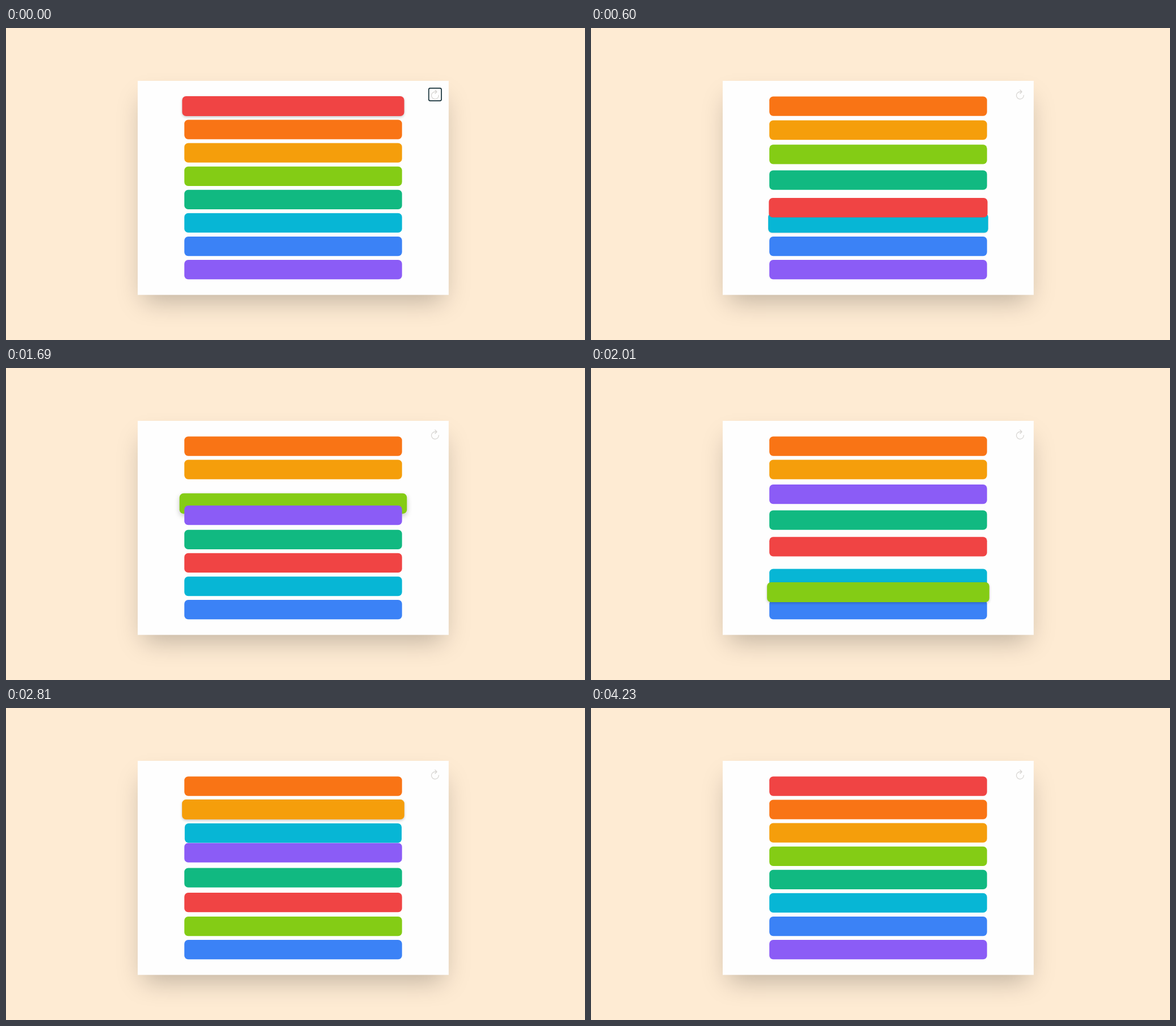
Recreate the animation shown at these times as an HTML page. Size 1020x549 px, loop 4810 ms.

```html
<!DOCTYPE html>
<html lang="en">
<head>
<meta charset="utf-8">
<title>Reorder list</title>
<style>
  html, body { margin: 0; width: 100%; height: 100%; overflow: hidden; background: #feebd3; }
  #card {
    position: absolute; left: 232px; top: 93.4px; width: 640px; height: 440px;
    transform: scale(.856); transform-origin: 0 0;
    background: #fefefe; box-shadow: 0 25px 50px -12px rgba(0, 0, 0, .25);
  }
  .bar { position: absolute; left: 96px; top: 32px; width: 448px; height: 40px; border-radius: 8px; }
  #button { position: absolute; left: 599.5px; top: 16px; width: 24px; height: 24px; border-radius: 2px; }
  #button svg { display: block; width: 24px; height: 24px; fill: none; stroke-width: 32; stroke-linecap: round; stroke-linejoin: round; }
</style>
</head>
<body>
<div id="card">
  <div id="button">
    <svg viewBox="0 0 512 512">
      <path d="M330 138H256A160 160 0 1 0 416 294M256 58L336 138L256 218"/>
    </svg>
  </div>
</div>
<script>
const LOOP = 4810, RESET = 3667, SHIFT = 450, PITCH = 48;
const EDGE = 20 / PITCH; // half a bar, in slots
const COLORS = ['#f04444', '#f97415', '#f59e0b', '#84cc15', '#11b981', '#07b6d5', '#3b82f6', '#8b5cf6'];
const [RED, ORANGE, AMBER, LIME, GREEN, CYAN, BLUE, VIOLET] = COLORS.keys();

const card = document.getElementById('card');
const button = document.getElementById('button');
const icon = button.querySelector('svg');

const clamp = x => Math.min(1, Math.max(0, x));
const mix = (a, b, k) => a + (b - a) * k;
const smooth = x => { x = clamp(x); return x * x * (3 - 2 * x); };

// cubic-bezier(.4, 0, .1, 1)
function ease(x) {
  x = clamp(x);
  let lo = 0, hi = 1;
  for (let i = 0; i < 20; i++) {
    const s = (lo + hi) / 2, r = 1 - s;
    if (1.2 * r * r * s + .3 * r * s * s + s * s * s < x) lo = s; else hi = s;
  }
  return smooth(lo);
}

// Overdamped return to the slot: stiffness 200, damping 40
function settle(ms) {
  const a = 5.86, b = 34.14, t = ms / 1000;
  return (b * Math.exp(-a * t) - a * Math.exp(-b * t)) / (b - a);
}

// Underdamped step for scaling: stiffness 550, damping 30
function spring(ms) {
  if (ms <= 0) return 0;
  const t = ms / 1000, w = 18.03;
  return 1 - Math.exp(-15 * t) * (Math.cos(w * t) + 15 / w * Math.sin(w * t));
}

function along(points, t) {
  const i = Math.max(1, points.findIndex(p => p[0] >= t));
  const [t0, y0] = points[i - 1], [t1, y1] = points[i];
  return mix(y0, y1, clamp((t - t0) / (t1 - t0)));
}

const bars = COLORS.map(color => {
  const el = document.createElement('div');
  el.className = 'bar';
  el.style.background = color;
  card.append(el);
  return { el, offsets: [], sizes: [], lifts: [] };
});

function grow(id, on, off, amount) {
  bars[id].sizes.push(t => amount * (spring(t - on) - spring(t - off)));
}
const hover = (id, on, off) => grow(id, on, off, .02);

const order = [...COLORS.keys()];

// Drags a bar past one neighbour at each crossing; each neighbour slides into the gap.
function drag(id, dir, press, crossings, release, end) {
  const from = order.indexOf(id), final = from + dir * crossings.length;
  const points = [[press, from]];
  crossings.forEach((time, i) => {
    const slot = from + dir * i, neighbour = order[slot + dir];
    points.push([time, slot + dir * (1 - EDGE)]);
    bars[neighbour].offsets.push(t => -dir * ease((t - time) / SHIFT));
    order[slot] = neighbour;
    order[slot + dir] = id;
  });
  points.push([release, end]);
  bars[id].offsets.push(t =>
    t < press ? 0 :
    t < release ? along(points, t) - from :
    final - from + (end - final) * settle(t - release));
  bars[id].lifts.push([press, release + 700]);
  grow(id, press, release, .03);
}

hover(RED, -1000, 495);
drag(RED, 1, 70, [180, 247, 306, 373], 495, 4.54);
hover(CYAN, 540, 650);
hover(BLUE, 650, 740);
hover(VIOLET, 740, 1208);
drag(VIOLET, -1, 870, [980, 1056, 1106, 1159], 1208, 2.47);
hover(LIME, 1450, 1945);
drag(LIME, 1, 1600, [1716, 1783, 1831, 1895], 1945, 6.32);
hover(CYAN, 2230, 2620);
drag(CYAN, -1, 2340, [2450, 2527, 2573], 2620, 2.03);
hover(AMBER, 2660, 2860);

function drawBar(bar, id, t) {
  const sum = list => list.reduce((total, f) => total + f(t), 0);
  const slot = mix(id + sum(bar.offsets), id, ease((t - RESET) / SHIFT));
  const size = sum(bar.sizes), lift = Math.max(0, size / .05);
  const raised = bar.lifts.some(([a, b]) => t >= a && t < b);
  const style = bar.el.style;
  style.transform = `translateY(${slot * PITCH}px) scale(${1 + size})`;
  style.boxShadow = `0 ${5 * lift}px ${12 * lift}px rgba(0,0,0,${Math.min(.22, lift * .55)})`;
  style.zIndex = raised ? 20 : id;
}

function drawButton(t) {
  const leave = smooth((t - 3900) / 300);
  const tint = smooth((t - 3050) / 200) * (1 - leave);
  const zoom = smooth((t - 3300) / 150) * (1 - leave);
  const rgb = [[216, 122], [214, 128], [211, 186]].map(([a, b]) => mix(a, b, tint));
  icon.style.stroke = `rgb(${rgb})`;
  icon.style.transform = `scale(${1 + .15 * zoom})`;
  button.style.outline = t < 75 ? '2px solid #17323a' : 'none';
}

const start = performance.now();
function frame() {
  const t = (performance.now() - start) % LOOP;
  bars.forEach((bar, id) => drawBar(bar, id, t));
  drawButton(t);
  requestAnimationFrame(frame);
}
frame();
</script>
</body>
</html>
```
